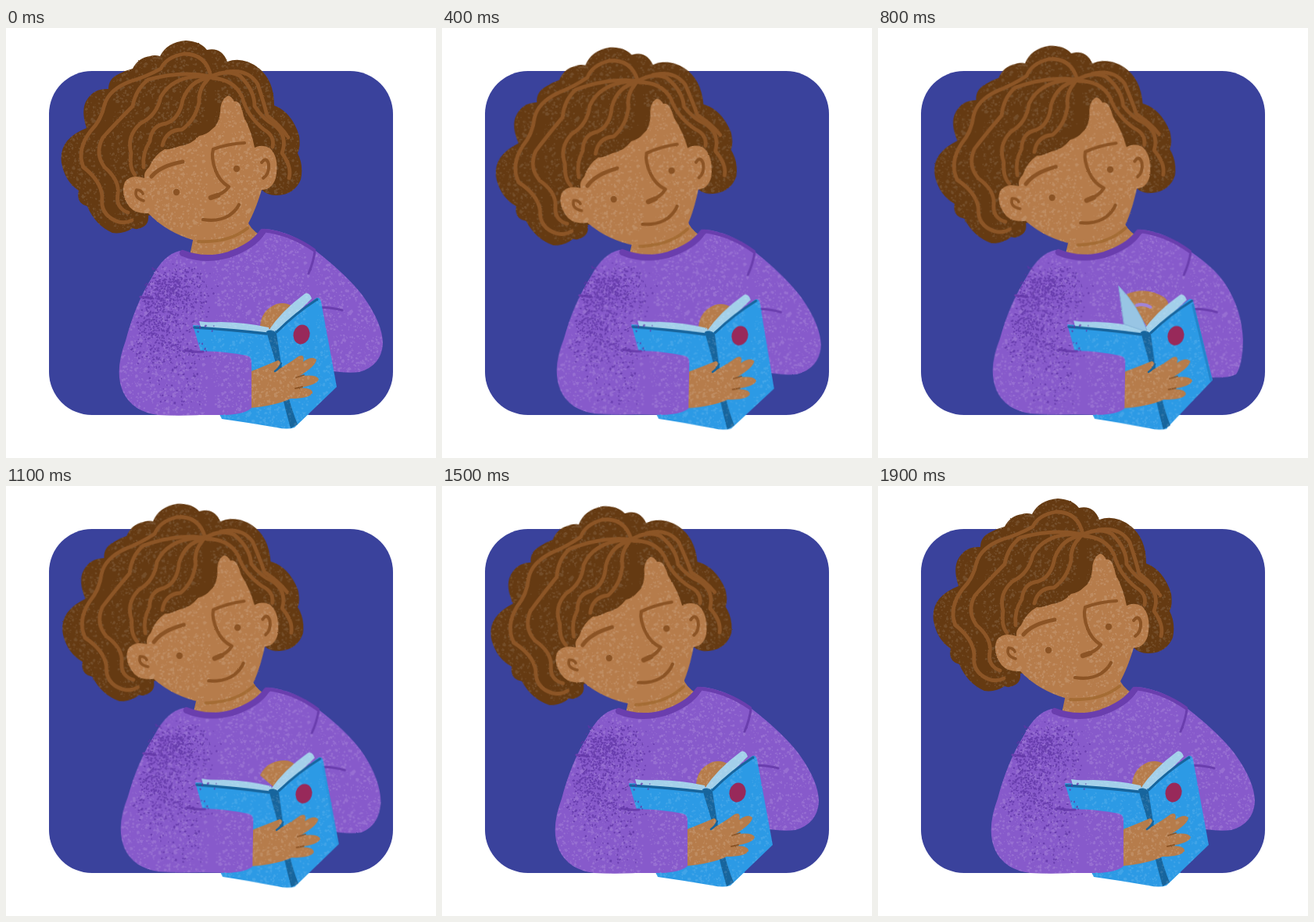
Animation of 550 by 550 pixels, one loop 2.9 s. Source, as an HTML page:

```html
<!DOCTYPE html>
<html lang="en">
<head>
<meta charset="utf-8">
<title>Reading</title>
<style>
html, body { margin: 0; width: 100%; height: 100%; overflow: hidden; background: #fff; }
svg { display: block; width: 100vw; height: 100vh; }
</style>
</head>
<body>
<svg id="stage" viewBox="0 0 550 550">
  <defs>
    <filter id="rough" filterUnits="userSpaceOnUse" x="0" y="0" width="550" height="550" color-interpolation-filters="sRGB">
      <feTurbulence type="fractalNoise" baseFrequency="0.28" numOctaves="2" seed="4" result="n"/>
      <feDisplacementMap in="SourceGraphic" in2="n" scale="1.6" xChannelSelector="R" yChannelSelector="G"/>
    </filter>
    <pattern id="speck" width="130" height="130" patternUnits="userSpaceOnUse">
      <path id="specks" fill="#fff"/>
    </pattern>
  </defs>
  <rect x="55" y="55" width="440" height="440" rx="55" fill="#3a429c"/>
  <g filter="url(#rough)" stroke-linecap="round" stroke-linejoin="round">
    <g id="body"></g>
    <g id="head"></g>
  </g>
</svg>
<script>
const NS = 'http://www.w3.org/2000/svg';
const $ = id => document.getElementById(id);
const body = $('body'), head = $('head');

let seed = 11;
const rnd = () => (seed = (seed * 16807) % 2147483647) / 2147483647;
const gauss = () => rnd() + rnd() + rnd() - 1.5;

function add(parent, tag, attrs) {
  const el = document.createElementNS(NS, tag);
  for (const k in attrs) el.setAttribute(k, attrs[k]);
  return parent.appendChild(el);
}
// flat colour plus a speckled layer of the same outline
function shape(parent, d, fill, grain = 0.13) {
  const els = [add(parent, 'path', { d, fill })];
  if (grain) els.push(add(parent, 'path', { d, fill: 'url(#speck)', opacity: grain }));
  return d => els.forEach(el => el.setAttribute('d', d));
}
const line = (parent, d, stroke, width) =>
  add(parent, 'path', { d, stroke, 'stroke-width': width, fill: 'none' });

function blob(x, y, r) {
  let d = '';
  for (let i = 0; i < 5; i++) {
    const a = i * 1.257, q = r * (0.5 + rnd() * 0.7);
    d += (i ? 'L' : 'M') + (x + q * Math.cos(a)).toFixed(1) + ' ' + (y + q * Math.sin(a)).toFixed(1);
  }
  return d + 'Z';
}
let dots = '';
for (let i = 0; i < 900; i++) dots += blob(3 + rnd() * 124, 3 + rnd() * 124, 0.7 + rnd() * rnd() * 2.4);
$('specks').setAttribute('d', dots);

const SKIN = '#b67c4b', BROWN = '#8c5425', HAIR = '#653a12', STRAND = '#8c5526';
const PURPLE = '#875acb', PLUM = '#6a3eae', BLUE = '#2c9ae5', NAVY = '#17659d', PAGE = '#a3d0ea';

// blend two path strings that share the same commands
function mix(a, b, k) {
  const to = b.match(/-?[\d.]+/g);
  let i = 0;
  return a.replace(/-?[\d.]+/g, n => (+n + (to[i++] - n) * k).toFixed(2));
}
const ARM = ['M395 284 Q436 316 456 342 Q482 378 482 404 Q480 432 452 440 Q436 442 412 438 L380 360Z',
             'M395 284 Q428 306 441 326 Q462 358 464 396 Q464 428 456 440 Q444 446 420 444 L380 360Z'];
const HAND = ['M325 382 Q326 361 346 353 Q358 350 366 356 L340 386Z',
              'M314 340 Q338 329 362 343 Q368 347 368 355 L343 384Z'];
const COVER = ['M341 391 L396 346 Q401 343 403 350 L423 459 L369 511Z',
               'M341 391 L393 346 Q398 342 400 350 L426 448 L368 511Z'];
const EDGE = ['M402 352 L422 458', 'M399 352 L424 448'];

// torso
shape(body, 'M241 262 L235 291 Q252 300 284 292 Q314 282 325 265 Q312 257 308 245Z', SKIN);
const setArm = shape(body, ARM[0], PURPLE);
shape(body, 'M222 285 Q201 290 186 320 Q165 354 153 400 Q138 440 150 466 Q162 491 195 495 Q250 498 315 488 L408 440 L405 362 L395 284 Q363 259 330 257 Q318 278 285 290 Q252 298 222 285Z', PURPLE);
line(body, 'M226 288 Q254 299 285 290 Q316 279 328 261', PLUM, 8);
line(body, 'M330 259 Q364 263 394 284', PLUM, 4.5);
line(body, 'M395 286 Q393 300 387 314', PLUM, 3);
line(body, 'M398 358 Q412 356 430 361', PLUM, 3);
line(body, 'M172 344 L188 346', PLUM, 3);

// book, far hand and turning leaf
const setHand = shape(body, HAND[0], SKIN);
const gap = line(body, 'M327 354 Q336 351 345 356', '#a184d8', 4);
shape(body, 'M239 380 L335 387 L345 391 L369 511 Q360 514 346 511 Q312 505 276 500 L273 494Z', BLUE, 0.1);
shape(body, 'M247 375 Q257 377 275 376 Q310 377 336 383 L338 390 Q290 387 249 382Z', PAGE, 0.1);
line(body, 'M241 383 Q290 386 333 391', NAVY, 3.5);
shape(body, 'M335 388 Q352 362 382 340 Q388 337 391 346 L347 390Z', PAGE, 0.1);
const leaf = add(body, 'path', { fill: '#98c5e4', stroke: '#82b2d6', 'stroke-width': 1 });
const setCover = shape(body, COVER[0], BLUE, 0.1);
const edge = line(body, EDGE[0], '#2385cb', 3);
line(body, 'M346 389 Q370 365 398 347', NAVY, 3);
shape(body, 'M333 388 Q341 384 346 391 L352 430 Q361 478 373 507 L364 512 Q352 470 344 425Z', NAVY, 0.1);
add(body, 'ellipse', { cx: 378, cy: 392, rx: 10.5, ry: 12.5, fill: '#98295a', transform: 'rotate(14 378 392)' });

// near arm and hand
shape(body, 'M314 439 Q334 431 348 425 Q355 428 346 438 Q362 429 374 420 Q383 416 380 427 Q391 419 397 424 Q397 432 374 446 Q396 442 400 449 Q398 457 374 460 Q393 460 392 467 Q388 474 364 474 Q345 483 312 486Z', SKIN);
line(body, 'M352 429 Q350 435 344 439', NAVY, 2.5);
line(body, 'M371 447 L381 444 M370 461 L379 459', BROWN, 1.8);
shape(body, 'M226 413 Q276 412 308 419 Q314 421 314 427 L314 486 Q306 494 280 495 L195 495 L180 440Z', PURPLE);
line(body, 'M229 412 Q238 415 252 414', PLUM, 3);
let shade = '';
for (const [x, y, sx, sy, n] of [[212, 335, 42, 28, 420], [190, 378, 30, 52, 380], [222, 400, 34, 80, 240]])
  for (let i = 0; i < n; i++) {
    const px = x + gauss() * sx, py = y + gauss() * sy;
    if (px > 180 - (py - 320) * 0.22 && py < 484) shade += blob(px, py, 0.9 + rnd() * 0.9);
  }
add(body, 'path', { d: shade, fill: '#5f35a6', opacity: 0.75 });

// head
shape(head, 'M182 240 Q183 250 176 254 Q168 259 162 256 Q150 264 136 262 Q114 252 104 228 Q89 224 93 208 Q75 196 71 172 Q67 142 103 128 Q95 104 104 91 Q113 77 131 78 Q131 64 146 58 Q154 54 162 52 Q169 38 184 36 Q190 34 197 36 Q206 18 230 16 Q249 17 257 28 Q276 24 283 43 Q303 36 323 51 Q343 67 343 99 Q366 108 375 138 Q377 152 373 160 Q381 176 377 194 Q369 213 347 214 Q335 215 326 206Z', HAIR, 0.1);
[
  'M262 62 Q256 33 228 33 Q205 37 198 52 Q180 62 160 68 Q132 78 126 98 Q122 118 108 132 Q90 156 99 178 Q122 196 123 216 Q120 238 141 247 Q152 251 161 246',
  'M262 62 Q225 54 182 66 Q166 78 162 100 Q140 122 124 140 Q113 160 126 178 Q146 195 143 213 Q140 230 156 236',
  'M262 62 Q215 58 198 88 Q193 112 172 122 Q154 138 160 160 Q157 178 165 188',
  'M260 64 Q236 66 226 92 Q222 116 205 122 Q186 124 184 145 Q174 160 176 178',
  'M258 66 Q246 78 247 95 Q242 118 225 130 Q205 130 200 150',
  'M262 62 Q285 52 300 62 Q318 80 318 100 Q330 118 343 124 Q361 138 353 160 Q366 178 362 192',
  'M264 64 Q292 66 302 88 Q308 112 330 130 Q344 138 341 152',
  'M282 56 Q310 52 322 72 Q330 96 334 112 Q352 126 361 140'
].forEach(d => line(head, d, STRAND, 4.8));
shape(head, 'M283 87 Q274 92 274 108 Q272 124 264 129 Q256 137 247 138 Q236 150 222 151 Q210 156 203 155 Q190 162 183 178 Q176 184 177 192 Q160 186 152 197 Q146 212 158 229 Q166 238 182 237 Q206 262 242 272 Q280 278 305 258 Q317 240 327 207 Q340 207 345 192 Q350 166 338 154 Q328 148 318 153 Q314 132 304 113 Q300 92 292 94 Q287 85 283 87Z', SKIN);
line(head, 'M246 273 Q285 275 309 256', '#a0682f', 4).setAttribute('opacity', 0.8);
line(head, 'M186 190 Q198 176 226 171', BROWN, 5);
line(head, 'M305 147 Q284 148 265 155 Q262 166 268 182 Q273 196 285 203 Q278 213 263 216', BROWN, 4.2);
line(head, 'M262 217 L271 214', BROWN, 6.5);
line(head, 'M252 245 Q272 248 285 240 Q294 234 298 226', BROWN, 4.2);
line(head, 'M176 221 Q163 217 167 207 Q173 207 175 212', BROWN, 3.6);
line(head, 'M327 172 Q333 164 336 174 Q337 187 329 192', BROWN, 4);
const eyes = add(head, 'g', { fill: BROWN });
add(eyes, 'circle', { cx: 218, cy: 210, r: 4.2 });
add(eyes, 'circle', { cx: 295, cy: 180, r: 4.2 });

// poses held for one step of 100 ms: head angle, head x, head y, body angle
const REST = [0, 0, 0, 0], LEAN = [-5, 5.3, 0.5, 1], READ = [-4.5, 8, -0.7, 1], TILT = [-5.9, 0, 0, 0];
const half = (a, b, k = 0.5) => a.map((v, i) => v + (b[i] - v) * k);
const NOD = [0, 0, 4.5, 0];
const poses = [
  REST, half(REST, NOD), NOD, half(NOD, LEAN), LEAN, half(LEAN, READ),
  READ, READ, READ, READ, READ, READ, READ,
  LEAN, half(LEAN, TILT), TILT, half(TILT, REST, 0.3), half(TILT, REST, 0.6), half(TILT, REST, 0.85), REST
];
const reach = { 7: 0.6, 8: 1, 9: 0.9, 10: 0.6, 11: 0.3 };
const tips = { 7: [348, 320], 8: [304, 330], 9: [274, 348], 10: [254, 366] };
const gaze = { 9: -1, 10: -1.5, 11: -0.8 };

let shown = -1;
function draw(ms) {
  const n = Math.min(19, Math.floor(ms % 2900 / 100));
  if (n === shown) return;
  shown = n;
  const [a, x, y, b] = poses[n], k = reach[n] || 0, tip = tips[n];
  head.setAttribute('transform', `translate(${x} ${y}) rotate(${a} 314 257)`);
  body.setAttribute('transform', `rotate(${b} 290 560)`);
  eyes.setAttribute('transform', `translate(${gaze[n] || 0} 0)`);
  setArm(mix(...ARM, k));
  setHand(mix(...HAND, k));
  setCover(mix(...COVER, k));
  edge.setAttribute('d', mix(...EDGE, k));
  edge.setAttribute('opacity', k);
  gap.setAttribute('opacity', k > 0.8 ? 1 : 0);
  if (tip) {
    const [tx, ty] = tip, fx = tx + (342 - tx) * 0.2, fy = ty + (387 - ty) * 0.85;
    leaf.setAttribute('d', `M${tx} ${ty} Q${(tx + 342) / 2 + 6} ${(ty + 387) / 2 - 4} 342 388 L${fx} ${fy}Z`);
  }
  leaf.setAttribute('opacity', tip ? 1 : 0);
}

let start;
function tick(now) {
  start ??= now;
  draw(now - start);
  requestAnimationFrame(tick);
}
draw(0);
requestAnimationFrame(tick);
</script>
</body>
</html>
```
